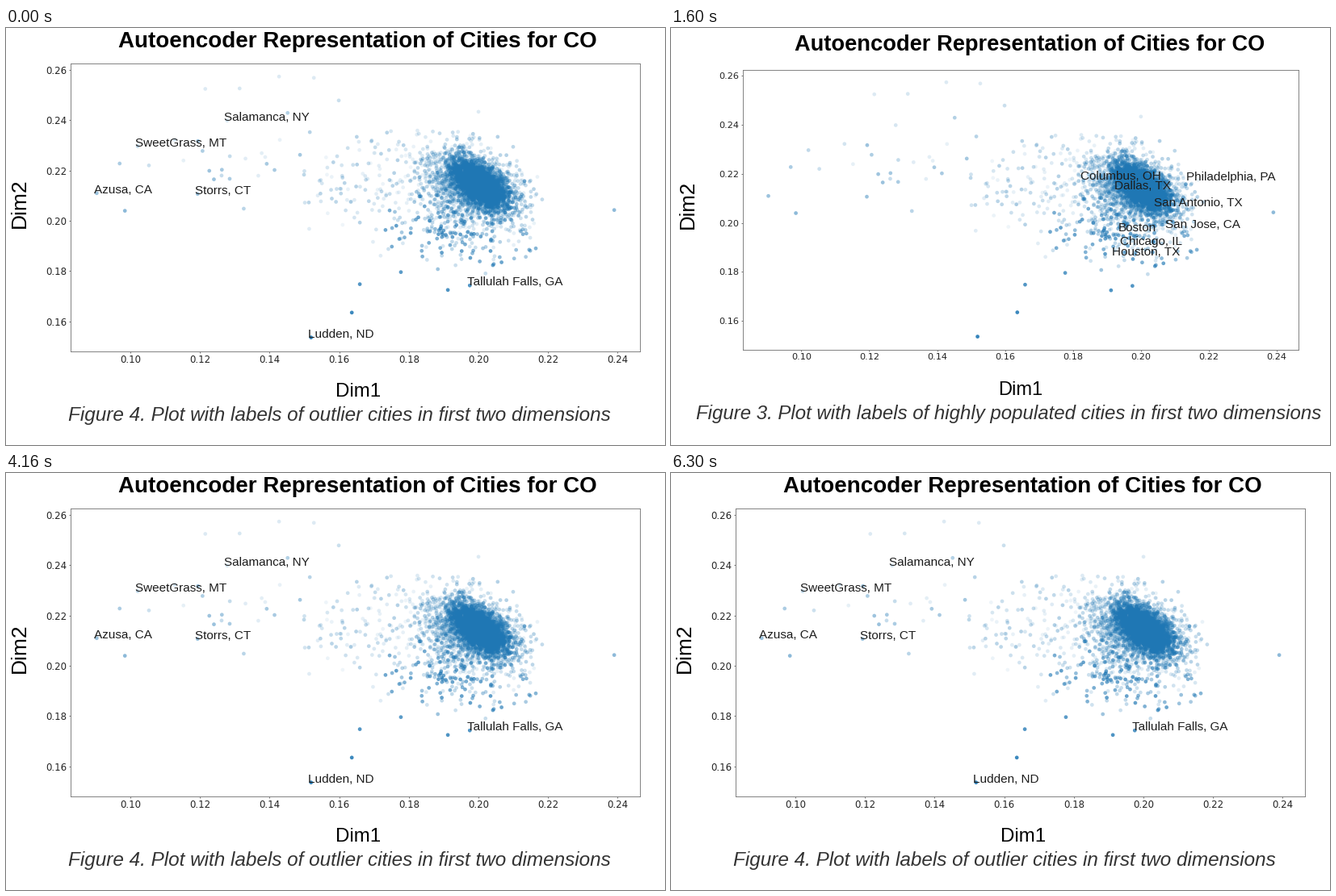
Recreate the animation shown at these times as a matplotlib script. Size 816 by 517 pixels, loop 7.1 s.

```python
import numpy as np
import matplotlib.pyplot as plt
from matplotlib.animation import FuncAnimation
from matplotlib.ticker import FormatStrFormatter, MultipleLocator

W, H, DPI = 816, 517, 100
PT = 72 / DPI  # points per pixel
BLUE = (0x1F / 255, 0x77 / 255, 0xB4 / 255)
XLIM, YLIM = (0.0828, 0.2464), (0.1482, 0.2626)
STEP_MS, FRAMES = 100, 71
SWITCHES = (16, 32, 48, 63)

OUTLIER_CITIES = {
    "Salamanca, NY": (0.1278, 0.2399), "SweetGrass, MT": (0.1021, 0.2297),
    "Azusa, CA": (0.0903, 0.2110), "Storrs, CT": (0.1193, 0.2107),
    "Tallulah Falls, GA": (0.1975, 0.1743), "Ludden, ND": (0.1519, 0.1536),
}
POPULOUS_CITIES = {
    "Columbus, OH": (0.1830, 0.2176), "Dallas, TX": (0.1930, 0.2138),
    "Philadelphia, PA": (0.2142, 0.2174), "San Antonio, TX": (0.2046, 0.2069),
    "Boston": (0.1942, 0.1965), "San Jose, CA": (0.2079, 0.1978),
    "Chicago, IL": (0.1946, 0.1909), "Houston, TX": (0.1923, 0.1866),
}
# Lone dots that mark the rim of the cloud.
RIM = [(0.0984, 0.2040), (0.1427, 0.2574), (0.1527, 0.2569), (0.1215, 0.2525),
       (0.2000, 0.2434), (0.2390, 0.2043), (0.1636, 0.1635), (0.1659, 0.1748),
       (0.1777, 0.1796), (0.1912, 0.1725)]


def make_points():
    """Return x, y and opacity of the lone dots, the fringes and the core."""
    rng = np.random.default_rng(4)

    def blob(n, center, sx, sy, corr, low, high):
        cov = [[sx * sx, corr * sx * sy], [corr * sx * sy, sy * sy]]
        xy = rng.multivariate_normal(center, cov, n)
        return np.column_stack([xy, rng.uniform(low, high, n)])

    def left_fringe(n):
        x = 0.201 - rng.gamma(1.6, 0.0125, n)
        y = rng.normal(0.2165, 0.0098, n)
        return np.column_stack([x, y, rng.uniform(0.07, 0.35, n)])

    cloud = np.vstack([
        left_fringe(360),
        blob(270, (0.1965, 0.1985), 0.0105, 0.0085, 0, 0.12, 0.70),
        blob(1250, (0.1992, 0.2140), 0.0072, 0.0072, -0.35, 0.08, 0.35),
        blob(2900, (0.2004, 0.2144), 0.0038, 0.0045, -0.55, 0.20, 0.55),
    ])
    x, y, _ = cloud.T
    cloud = cloud[(x > 0.149) & (x < 0.2185) & (y > 0.177) & (y < 0.2365)]
    sparse = blob(26, (0.133, 0.224), 0.016, 0.012, 0, 0.10, 0.45)

    # Lone dots are darker the lower they lie.
    lone = np.array([*OUTLIER_CITIES.values(), *RIM])
    opacity = np.clip(9 * (0.26 - lone[:, 1]), 0.15, 0.9)
    return np.vstack([np.column_stack([lone, opacity]), sparse, cloud])


def make_panel(fig, points, box, tick_size, cities, texts):
    """Draw one complete page; box is left, top, right, bottom in pixels."""
    left, top, right, bottom = box
    ax = fig.add_axes([left / W, 1 - bottom / H,
                       (right - left) / W, (bottom - top) / H])
    x, y, alpha = points.T
    ax.scatter(x, y, s=(4.7 * PT) ** 2, c=[(*BLUE, a) for a in alpha],
               linewidths=0)
    ax.set(xlim=XLIM, ylim=YLIM)
    for axis in (ax.xaxis, ax.yaxis):
        axis.set_major_locator(MultipleLocator(0.02))
        axis.set_major_formatter(FormatStrFormatter("%.2f"))
    ax.tick_params(length=2.5 * PT, width=0.8 * PT, pad=2.3 * PT,
                   color="#555555", labelsize=tick_size * PT,
                   labelcolor="#222222", labelfontfamily="DejaVu Sans")
    ax.tick_params(axis="x", pad=1.6 * PT)
    for spine in ax.spines.values():
        spine.set(linewidth=0.9 * PT, edgecolor="#777777")

    for name, (cx, cy) in cities.items():
        ax.text(cx - 0.0008, cy, name, fontsize=15.3 * PT, color="#1c1c1c",
                family="Liberation Sans", va="baseline")
    for px, py, text, size, style in texts:
        ax.text(px / W, 1 - py / H, text, fontsize=size * PT,
                family="Liberation Sans", ha="center", va="baseline",
                rotation_mode="anchor", transform=fig.transFigure, **style)
    return ax


TITLE = "Autoencoder Representation of Cities for CO"
CAPTION = "Figure {}. Plot with labels of {} cities in first two dimensions"
BOLD = {"weight": "bold"}
UPRIGHT = {"rotation": 90}
SLANTED = {"style": "italic", "color": "#333333"}

fig = plt.figure(figsize=(W / DPI, H / DPI), dpi=DPI, facecolor="white")
points = make_points()

outlier_panel = make_panel(
    fig, points, (80, 44, 785, 400.5), 11.7, OUTLIER_CITIES,
    [(435, 23.5, TITLE, 27.75, BOLD),
     (436, 457, "Dim1", 24, {}),
     (24, 217, "Dim2", 26.4, UPRIGHT),
     (413, 487.5, CAPTION.format(4, "outlier"), 24.2, SLANTED)])

populous_panel = make_panel(
    fig, points, (89, 51.5, 777, 399), 11.3, POPULOUS_CITIES,
    [(444, 28.5, TITLE, 27.3, BOLD),
     (432.5, 455, "Dim1", 23.6, {}),
     (27.5, 219, "Dim2", 25.7, UPRIGHT),
     (418.5, 485, CAPTION.format(3, "highly populated"), 24.05, SLANTED)])


def update(frame):
    second = sum(frame >= s for s in SWITCHES) % 2 == 1
    outlier_panel.set_visible(not second)
    populous_panel.set_visible(second)
    return outlier_panel, populous_panel


anim = FuncAnimation(fig, update, frames=FRAMES, interval=STEP_MS,
                     repeat=True, repeat_delay=0, blit=False)
plt.show()
```
